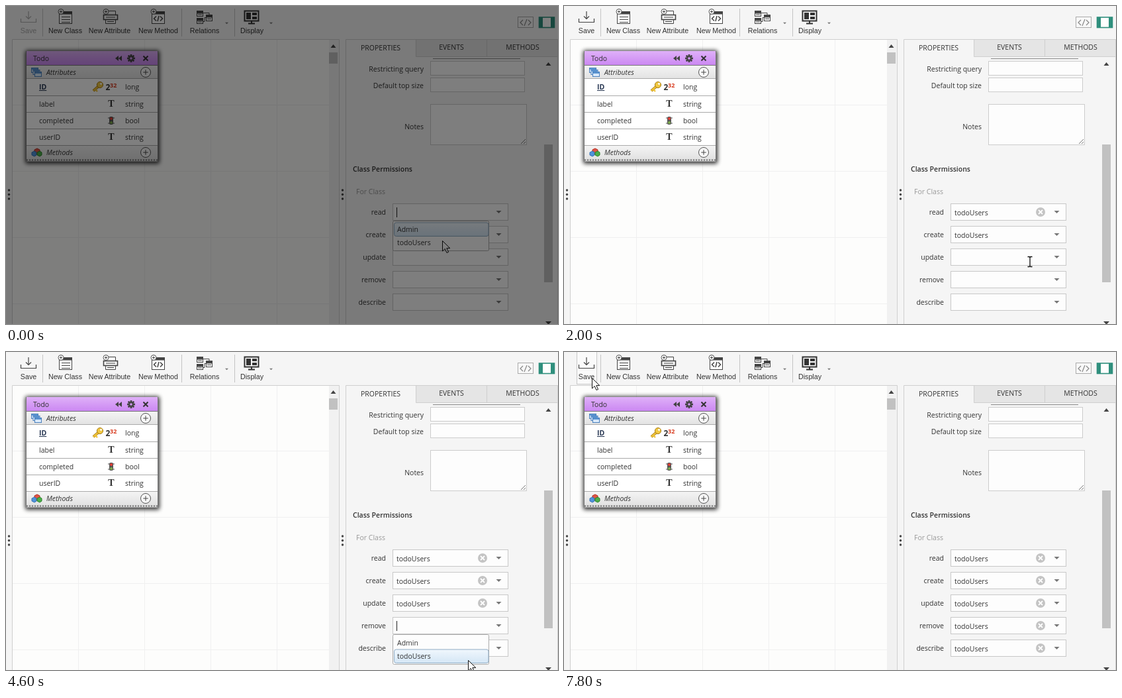
An HTML page that plays this animation: 834 px wide and 480 px high, repeating every 8 s.

```html
<!DOCTYPE html>
<html lang="en">
<head>
<meta charset="utf-8">
<title>Class permissions editor</title>
<style>
  html, body { margin: 0; width: 100%; height: 100%; overflow: hidden; background: #f5f5f5; }
  svg { display: block; width: 834px; height: 480px; font: 10.5px "Open Sans", "Noto Sans", sans-serif; fill: #333; }
  .tool { font: 10.7px "Liberation Sans", Arial, sans-serif; }
</style>
</head>
<body>
<svg id="stage" viewBox="0 0 834 480">
  <defs>
    <linearGradient id="purple" x2="0" y2="1"><stop stop-color="#dfb0f8"/><stop offset="1" stop-color="#cb88f2"/></linearGradient>
    <linearGradient id="section" x2="0" y2="1"><stop stop-color="#f4f4f4"/><stop offset="1" stop-color="#e2e2e2"/></linearGradient>
    <linearGradient id="hover" x2="0" y2="1"><stop stop-color="#f0f7fd"/><stop offset="1" stop-color="#d4e6f5"/></linearGradient>
    <filter id="blur" x="-20%" y="-20%" width="140%" height="140%"><feGaussianBlur stdDeviation="3"/></filter>
  </defs>
  <g id="base"></g>
  <g id="live"></g>
</svg>
<script>
const LOOP = 8000, STEP = 200;
const FIELDS = ['read', 'create', 'update', 'remove', 'describe'];
const opened = [0, 1200, 2400, 3800, 5600];
const hovered = [400, 1400, 2800, 4200, 6200];
const chosen = [600, 1800, 3200, 5000, 6800];
const clearable = [1200, 2400, 3800, 5600, 7200];
// time, x, y of the pointer
const pointerPath = [
  [0, 659, 354], [200, 659, 354], [600, 664, 359], [1000, 688, 347], [1200, 690, 348],
  [1400, 690, 386], [1800, 698, 391], [2000, 704, 386], [2400, 706, 382], [2800, 703, 422],
  [3200, 706, 426], [3600, 713, 419], [3800, 712, 416], [4200, 704, 457], [4600, 698, 465],
  [5000, 698, 465], [5600, 719, 449], [6000, 721, 471], [6200, 721, 486], [6800, 721, 490],
  [7200, 690, 452], [7400, 480, 316], [7600, 150, 104], [7800, 42, 39]
];

const rect = (x, y, w, h, fill, stroke = 'none', more = '') =>
  `<rect x="${x}" y="${y}" width="${w}" height="${h}" fill="${fill}" stroke="${stroke}" ${more}/>`;
const path = (d, stroke = '#444', fill = 'none', width = 1) =>
  `<path d="${d}" stroke="${stroke}" fill="${fill}" stroke-width="${width}"/>`;
const circle = (x, y, r, fill, stroke = 'none') =>
  `<circle cx="${x}" cy="${y}" r="${r}" fill="${fill}" stroke="${stroke}"/>`;
const text = (x, y, s, more = '') => `<text x="${x}" y="${y}" ${more}>${s}</text>`;
const label = (x, y, s) => text(x, y, s, 'text-anchor="end"');
const tool = (x, s) => text(x, 41, s, 'class="tool" text-anchor="middle"');
const plus = (x, y, r) => circle(x, y, r, '#f8f8f8', '#555') + path(`M${x - r / 2} ${y}h${r}M${x} ${y - r / 2}v${r}`);
const caretDown = (x, y, r = 4) => path(`M${x - r} ${y - r / 2}h${2 * r}l${-r} ${r}z`, 'none', '#777');
const caretUp = (x, y) => path(`M${x - 4} ${y + 2}h8l-4 -5z`, 'none', '#444');
const table = (x, y, w, h) => rect(x, y, w, h, '#fff', '#444') + rect(x, y, w, 4, '#444');

function toolbar() {
  let s = path('M55.5 4V46M265.5 4V46M345.5 4V46', '#c4c4c4');
  s += table(80.5, 8.5, 19, 18) + path('M84 16.5h13M84 20.5h13M84 24.5h13') + plus(83, 8.5, 4);
  s += tool(89.5, 'New Class');
  s += path('M150.5 13V7.5h15V13M150.5 21v5.5h15V21') + rect(147.5, 13.5, 21, 7, '#f8f8f8', '#444', 'stroke-width="1.6"')
    + path('M151 17h14M153 23.5h10') + plus(151, 8.5, 4) + tool(156.5, 'New Attribute');
  s += table(220.5, 8.5, 19, 18) + path('M227 15.5l-3.5 3.5 3.5 3.5M233 15.5l3.5 3.5-3.5 3.5M231 15l-2 8', '#444', 'none', 1.5)
    + plus(223, 8.5, 4) + tool(230, 'New Method');
  s += table(288.5, 7.5, 9, 8) + table(288.5, 18.5, 9, 8) + table(302.5, 13.5, 9, 9)
    + path('M298 10.5h9v3M298 23.5h2v-6h3M290 13h6M290 24h6M304 19.5h6') + tool(300, 'Relations') + caretDown(333.5, 26, 2.5);
  s += rect(360.5, 7.5, 21, 15, '#fff', '#333', 'stroke-width="2"') + rect(363, 10, 7, 10, '#333')
    + rect(372, 10, 7, 4, '#333') + rect(372, 16, 7, 4, '#333') + path('M371 23v3M366 26.5h10', '#333', 'none', 2)
    + tool(371.5, 'Display') + caretDown(400.5, 26, 2.5);
  s += rect(773.5, 16.5, 23, 16, '#f8f8f8', '#aaa')
    + path('M781 21l-4 4 4 4M789 21l4 4-4 4M787 20l-4 10', '#888', 'none', 1.2);
  s += rect(805.5, 17, 23, 15.5, '#fff', '#2f8f7d', 'stroke-width="1.6"')
    + rect(806, 17, 5, 15, '#2f8f7d') + rect(823, 17, 5, 15, '#2f8f7d');
  return s;
}

function canvasArea() {
  let s = rect(9, 50, 494, 431, '#fdfdfc') + rect(488, 51, 15, 430, '#f1f1f1');
  for (let i = 0; i < 4; i++) {
    s += path(`M${109.5 + 100 * i} 51V480M10 ${149.5 + 100 * i}H488`, '#f0f0f0');
  }
  s += path('M9.5 480V50.5H503.5V480', '#cfcfcf');
  s += caretUp(494.5, 61) + rect(488, 70, 13, 17, '#c1c1c1');
  for (const x of [4.5, 508.5]) for (const y of [278, 284.5, 291]) s += circle(x, y, 1.7, '#444');
  return s;
}

const section = (y, h, name) => rect(31, y, 198, h, 'url(#section)')
  + text(61, y + h / 2 + 4, name, 'font-style="italic"') + plus(211, y + h / 2, 7.5);

function gear(x, y) {
  let s = '';
  for (let a = 0; a < 360; a += 45) s += rect(x - 1.2, y - 6, 2.4, 12, '#444', 'none', `transform="rotate(${a} ${x} ${y})"`);
  return s + circle(x, y, 4, '#444') + circle(x, y, 1.8, '#d398f4');
}

function classBox() {
  let s = rect(29, 67, 203, 171, '#000', 'none', 'opacity=".8" rx="3" filter="url(#blur)"');
  s += rect(30.5, 68.5, 199, 166, '#fff', '#777') + rect(31, 68, 198, 21, 'url(#purple)') + path('M31 89.5H229', '#777');
  s += text(41, 83, 'Todo');
  s += path('M170 75v8l-5-4zM175 75v8l-5-4z', 'none', '#444') + gear(189, 79) + path('M207.5 75.5l7 7m0-7l-7 7', '#333', 'none', 2);
  s += section(90, 20, 'Attributes') + section(211, 20, 'Methods');
  for (let i = 0; i < 3; i++) s += rect(38.5 + 2.5 * i, 93.5 + 3 * i, 10, 7, '#d8e9fa', '#4b80bd') + rect(39 + 2.5 * i, 94 + 3 * i, 9, 2, '#5e98d4');
  s += path('M43 217l4-2 4 2v5l-4 2-4-2z', '#b52c22', '#e05545') + path('M39 221l4-2 3 2v4l-3 2-4-2z', '#3270b5', '#5093da')
    + path('M47 221l4-2 3 2v4l-3 2-4-2z', '#2b832b', '#4daf4b');
  s += path('M31 109.5H229M31 135.5H229M31 160.5H229M31 185.5H229M31 210.5H229', '#aaa');
  const rows = [['ID', 'long'], ['label', 'string'], ['completed', 'bool'], ['userID', 'string']];
  rows.forEach(([name, type], i) => {
    const y = i ? 127 + 25 * i : 126;
    s += text(50, y, name, i ? '' : 'font-weight="700" text-decoration="underline" fill="#2b3a55"') + text(180, y, type);
    if (i % 2) s += text(159, y, 'T', 'font-family="Liberation Serif, serif" font-weight="700" font-size="14" text-anchor="middle"');
  });
  s += path('M140 121L132 128', '#a87b13', 'none', 4) + path('M140 121l-8 7m3-2l3 3', '#eec238', 'none', 2.4)
    + circle(142, 119, 4.6, '#f0c843', '#a87b13') + circle(143.5, 117.5, 1.4, '#fff');
  s += text(150.5, 127, '2', 'font-weight="700" font-size="12"') + text(157, 123, '32', 'font-weight="700" font-size="9" fill="#d83c20"');
  s += rect(156, 167, 6, 12, '#555', 'none', 'rx="2"') + path('M154 169h10M154 177h10', '#555')
    + circle(159, 170, 2.1, '#e33d35') + circle(159, 176, 2.1, '#7dab4d');
  s += rect(31, 231, 198, 3.5, '#d5d5d5') + `<path d="M31 232.5H229" stroke="#777" stroke-width="2" stroke-dasharray="2 2"/>`;
  return s;
}

function panel() {
  let s = rect(513, 50, 321, 430, '#f5f5f5') + rect(619, 51, 215, 26, '#e5e5e5');
  s += path('M513.5 480V50.5H834M619.5 51V76.5H834M726.5 51V77M833.5 50V480', '#cfcfcf');
  s += text(566, 67, 'PROPERTIES', 'text-anchor="middle"') + text(673, 66, 'EVENTS', 'text-anchor="middle"')
    + text(780.5, 66, 'METHODS', 'text-anchor="middle"');
  s += path('M645 79.5H777', '#888');
  s += label(631, 99, 'Restricting query') + label(631, 124, 'Default top size') + label(631, 186, 'Notes');
  for (const [y, w, h] of [[83.5, 142, 21], [108.5, 142, 21], [148.5, 145, 61]]) s += rect(641.5, y, w, h, '#fdfdfd', '#ccc');
  s += path('M778 208l7-7M782 208l3-3', '#777');
  s += text(524, 250, 'Class Permissions', 'font-weight="600"') + text(529, 284, 'For Class', 'fill="#999"');
  s += caretUp(819.5, 88) + rect(813, 209, 13, 208, '#c1c1c1') + path('M815 476h9l-4.5 5z', 'none', '#444');
  return s;
}

const fieldY = i => 311 + 34 * i;

function field(name, i, t) {
  const y = fieldY(i);
  let s = label(574, y + 4, name) + rect(584.5, y - 12.5, 174, 25, '#fdfdfd', '#c8c8c8') + caretDown(744.5, y);
  if (t >= chosen[i]) s += text(590, y + 5, 'todoUsers');
  else if (t >= opened[i]) s += path(`M590.5 ${y - 7}v15`, '#222');
  if (t >= clearable[i]) s += circle(720, y, 7, '#c4c4c4') + path(`M717 ${y - 3}l6 6m0-6l-6 6`, '#fff', 'none', 1.8);
  return s;
}

function menu(i, t) {
  const y = fieldY(i), pick = t >= hovered[i] ? 20 : 0;
  return rect(584.5, y + 13.5, 145, 45, '#fdfdfd', '#aaa', 'rx="2"')
    + rect(586.5, y + 16 + pick, 142.5, 20.5, 'url(#hover)', '#8eabc3', 'rx="3"')
    + text(591, y + 30, 'Admin') + text(591, y + 50, 'todoUsers');
}

function save(t) {
  const icon = path('M22.5 19v5.5h23V19M34 8v11M30 15.5l4 4 4-4', '#444', 'none', 1.2) + tool(34, 'Save');
  const frame = t >= 7800 ? rect(19.5, -0.5, 30, 49, '#fafafa', '#c8c8c8') : '';
  return frame + `<g opacity="${t < chosen[0] ? 0.4 : 1}">${icon}</g>`;
}

function pointer(t, menuIndex) {
  const k = Math.max(1, pointerPath.findIndex(p => p[0] >= t));
  const [t0, x0, y0] = pointerPath[k - 1], [t1, x1, y1] = pointerPath[k];
  const u = (t - t0) / (t1 - t0);
  const x = x0 + (x1 - x0) * u, y = y0 + (y1 - y0) * u;
  const overField = x > 584 && x < 735 && FIELDS.some((_, i) => Math.abs(y - fieldY(i)) < 13);
  const overMenu = menuIndex >= 0 && y > fieldY(menuIndex) + 13;
  const shape = overField && !overMenu
    ? path('M-3.5 -7.5h2.5l1 1 1-1h2.5M0 -6.5v13M-3.5 7.5h2.5l1-1 1 1h2.5', '#111', 'none', 1.3)
    : path('M.5 .5v15.5l3.7-3.5 2.8 6 2.6-1.2-2.8-5.7h5z', '#111', '#fff');
  return `<g transform="translate(${x} ${y})">${shape}</g>`;
}

const live = document.getElementById('live');
document.getElementById('base').innerHTML =
  rect(0, 0, 834, 480, '#f5f5f5') + toolbar() + canvasArea() + classBox() + panel();

function draw(t) {
  const open = FIELDS.findIndex((_, i) => t >= opened[i] && t < chosen[i]);
  live.innerHTML = save(t) + FIELDS.map((name, i) => field(name, i, t)).join('')
    + (open >= 0 ? menu(open, t) : '') + pointer(t, open)
    + (t < STEP ? rect(0, 0, 834, 480, '#000', 'none', 'opacity=".5"') : '');
}

const start = performance.now();
let shown = -1;
function tick() {
  const t = Math.floor((performance.now() - start) % LOOP / STEP) * STEP;
  if (t !== shown) draw(shown = t);
  requestAnimationFrame(tick);
}
tick();
</script>
</body>
</html>
```
